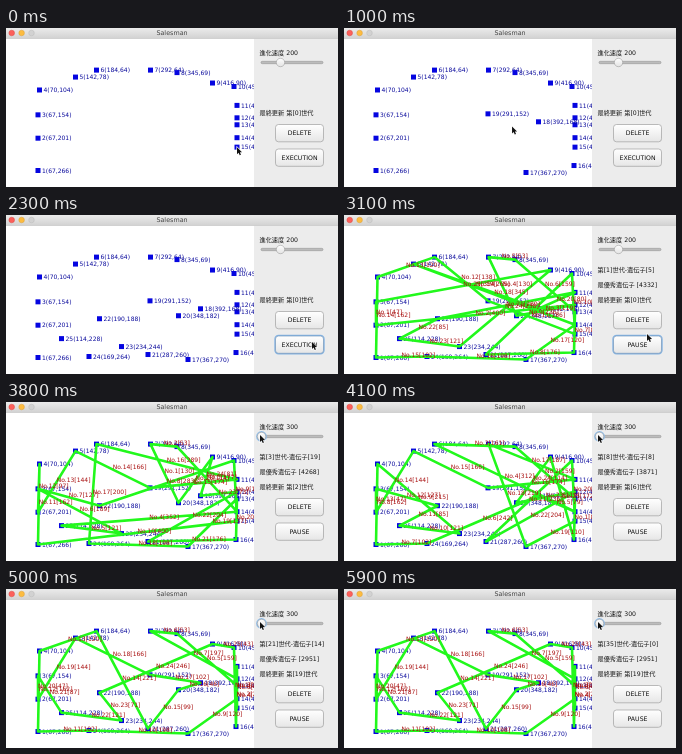
Animation, 332 px wide and 159 px high, one loop 6 s. Source, as an HTML page with a canvas:

```html
<!DOCTYPE html>
<html lang="ja">
<head>
<meta charset="utf-8">
<title>Salesman</title>
<style>
html, body { margin: 0; width: 100%; height: 100%; overflow: hidden; background: #fff; }
canvas { display: block; width: 332px; height: 159px; }
</style>
</head>
<body>
<canvas id="stage"></canvas>
<script>
const W = 332, H = 159, LOOP = 6000, STEP = 100, SPLIT = 248;
const FONT = '"DejaVu Sans", "Noto Sans CJK JP", "Noto Sans CJK", sans-serif';
const canvas = document.getElementById('stage');
const ctx = canvas.getContext('2d');
const dpr = window.devicePixelRatio || 1;
canvas.width = W * dpr;
canvas.height = H * dpr;

// Cities in the order they are clicked
const cities = [
  [67, 266], [67, 201], [67, 154], [70, 104], [142, 78],
  [184, 64], [292, 64], [345, 69], [416, 90], [459, 97],
  [465, 135], [465, 160], [465, 174], [465, 200], [465, 219],
  [463, 256], [367, 270], [392, 168], [291, 152], [348, 182],
  [287, 260], [190, 188], [234, 244], [169, 264], [114, 228]
];
const place = ([x, y]) => [x * 0.5 - 1.5, y * 0.497 + 10.3];

// One click every CLICK ms, starting with the fifteenth city
const CLICK = 200, OFFSET = 50, CLICKED = 15;
const START = 2420, GENES = 20;

const good = [10, 15, 18, 12, 21, 16, 13, 8, 7, 20, 14, 17, 24, 1, 4, 6, 11, 19, 5, 2, 3, 22, 25, 23, 9];
const best = [10, 16, 11, 15, 13, 8, 7, 12, 14, 17, 24, 1, 4, 6, 21, 20, 18, 19, 5, 2, 3, 25, 23, 22, 9];

function edges(tour) {
  return tour.map((n, i) => {
    const a = cities[n - 1], b = cities[tour[(i + 1) % tour.length] - 1];
    return { mid: [(a[0] + b[0]) / 2, (a[1] + b[1]) / 2], len: Math.hypot(a[0] - b[0], a[1] - b[1]) };
  });
}
const total = tour => edges(tour).reduce((sum, e) => sum + e.len, 0);

function seeded(seed) {
  return () => (seed = (seed * 16807) % 2147483647) / 2147483647;
}

// Reverses random stretches of a tour until it is about as long as the goal
function worsen(tour, goal) {
  const random = seeded(goal);
  for (let i = 0; i < 80; i++) {
    const [a, b] = [random(), random()].map(r => Math.floor(r * 26)).sort((p, q) => p - q);
    const next = [...tour.slice(0, a), ...tour.slice(a, b).reverse(), ...tour.slice(b)];
    const len = total(next);
    if (len > total(tour) && len <= goal) tour = next;
  }
  return tour;
}

const records = [[0, 4332], [2, 4268], [6, 3871], [9, 3612], [12, 3398], [19, 2951]]
  .map(([gen, score]) => ({
    gen, score,
    tour: gen < 12 ? worsen(good, score) : gen < 19 ? good : best
  }));

const geneKeys = [[START, 0], [3100, 25], [3680, 45], [3800, 79], [4500, 287], [5900, 700]];
const knobKeys = [[3450, 274], [3680, 255]];
const pointerKeys = [[2250, 306, 127], [2600, 306, 127], [3100, 303, 119], [3450, 273, 34], [3680, 254, 33]];

function interp(keys, t, col = 1) {
  const i = keys.findIndex(k => t <= k[0]);
  if (i === 0) return keys[0][col];
  if (i < 0) return keys[keys.length - 1][col];
  const a = keys[i - 1], b = keys[i];
  return a[col] + (b[col] - a[col]) * (t - a[0]) / (b[0] - a[0]);
}

const clicked = t => Math.min(cities.length, CLICKED + Math.max(0, Math.floor((t - OFFSET) / CLICK)));

// The pointer hops from city to city, then works the panel
function pointer(t) {
  const n = clicked(t);
  if (t > pointerKeys[0][0]) return [interp(pointerKeys, t, 1), interp(pointerKeys, t, 2)];
  const from = place(cities[n - 1]);
  const to = n < cities.length ? place(cities[n]) : pointerKeys[0].slice(1);
  const p = Math.max(0, (t - OFFSET) / CLICK - (n - CLICKED));
  const ease = p * p * (3 - 2 * p);
  return from.map((v, i) => v + (to[i] - v) * ease);
}

function text(str, x, y, color, size = 6, align = 'left') {
  ctx.font = `${size}px ${FONT}`;
  ctx.textAlign = align;
  ctx.fillStyle = color;
  ctx.fillText(str, x, y);
}

function disc(x, y, r, fill, stroke, width = 0.5) {
  ctx.beginPath();
  ctx.arc(x, y, r, 0, Math.PI * 2);
  ctx.fillStyle = fill;
  ctx.fill();
  ctx.strokeStyle = stroke;
  ctx.lineWidth = width;
  ctx.stroke();
}

function shade(y0, y1, from, to) {
  const g = ctx.createLinearGradient(0, y0, 0, y1);
  g.addColorStop(0, from);
  g.addColorStop(1, to);
  return g;
}

function box(x, y, w, h, r, fill, stroke, width) {
  ctx.beginPath();
  ctx.roundRect(x, y, w, h, r);
  ctx.fillStyle = fill;
  ctx.fill();
  ctx.strokeStyle = stroke;
  ctx.lineWidth = width;
  ctx.stroke();
}

function drawTitle() {
  ctx.fillStyle = shade(0, 10, '#ebebeb', '#d3d3d3');
  ctx.fillRect(0, 0, W, 10.5);
  ctx.fillStyle = '#b8b8b8';
  ctx.fillRect(0, 10, W, 0.5);
  disc(5.7, 5, 2.8, '#fc605b', '#de4643');
  disc(15.6, 5, 2.8, '#fdbc40', '#dd9f34');
  disc(25.5, 5, 2.8, '#d2d2d2', '#bababa');
  text('Salesman', 166, 7.3, '#444', 6.4, 'center');
}

function drawCity(city, i) {
  const [x, y] = place(city);
  ctx.fillStyle = '#0505e0';
  ctx.fillRect(x - 2.5, y - 2.5, 5, 5);
  text(`${i + 1}(${city})`, x + 4, y + 2.3, '#0a0a9c');
}

function drawTour(tour) {
  ctx.beginPath();
  tour.forEach(n => ctx.lineTo(...place(cities[n - 1])));
  ctx.closePath();
  ctx.strokeStyle = '#22f81c';
  ctx.lineWidth = 2.6;
  ctx.lineJoin = 'round';
  ctx.stroke();
  edges(tour).forEach(({ mid, len }, i) => {
    text(`No.${i + 1}[${Math.floor(len)}]`, ...place(mid), '#a80f0f');
  });
}

function drawMap(t, record) {
  ctx.save();
  ctx.beginPath();
  ctx.rect(0, 10.5, SPLIT, H);
  ctx.clip();
  cities.slice(0, clicked(t)).forEach(drawCity);
  if (record) drawTour(record.tour);
  ctx.restore();
}

function drawButton(label, y, focus) {
  const x = 269.5, w = 48, h = 17.3;
  if (focus) box(x, y, w, h, 3, '#fff', '#86b5e4', 2.4);
  box(x, y, w, h, 3, shade(y, y + h, '#fff', '#e6e6e6'), focus ? '#7799bb' : '#a0a0a0', 0.7);
  text(label, x + w / 2, y + h / 2 + 2.3, '#111', 6.2, 'center');
}

function drawSlider(knob, focus) {
  box(255, 33.3, 62, 2.4, 1.2, '#bcbcbc', '#8c8c8c', 0.5);
  if (focus) disc(knob + 0.5, 34.5, 4.4, '#fff', '#8fbce8', 2);
  disc(knob + 0.5, 34.5, 4.2, shade(30, 39, '#fff', '#e2e2e2'), '#909090');
}

function drawPanel(t, genes, record) {
  const knob = interp(knobKeys, t);
  const speed = 200 + Math.round((274 - knob) / 19 * 100);
  const dragged = t > 3400;
  const line = (str, y) => text(str, 253.5, y, '#151515', 6.2);

  ctx.fillStyle = '#ececec';
  ctx.fillRect(SPLIT, 10.5, W - SPLIT, H);
  line(`進化速度 ${speed}`, 26.5);
  drawSlider(knob, dragged);
  if (record) {
    line(`第[${Math.floor(genes / GENES)}]世代-遺伝子[${genes % GENES}]`, 56.5);
    line(`最優秀遺伝子 [${record.score}]`, 72.3);
  }
  line(`最終更新 第[${record ? record.gen : 0}]世代`, 87.2);
  drawButton('DELETE', 96.5, false);
  drawButton(record ? 'PAUSE' : 'EXECUTION', 121, t >= 2200 && !dragged);
}

function drawCursor(t) {
  const arrow = [[0, 0], [0, 7.8], [1.8, 6.2], [3, 9], [4.4, 8.4], [3.2, 5.7], [5.6, 5.6]];
  ctx.save();
  ctx.translate(...pointer(t));
  ctx.scale(0.9, 0.9);
  ctx.beginPath();
  arrow.forEach(p => ctx.lineTo(...p));
  ctx.closePath();
  ctx.strokeStyle = '#fff';
  ctx.lineWidth = 1.2;
  ctx.stroke();
  ctx.fillStyle = '#111';
  ctx.fill();
  ctx.restore();
}

function draw(now) {
  const t = Math.floor((now % LOOP) / STEP) * STEP;
  const genes = Math.floor(interp(geneKeys, t) + 1e-6);
  const record = t < START ? null : records.filter(r => r.gen * GENES <= genes).pop();

  ctx.setTransform(dpr, 0, 0, dpr, 0, 0);
  ctx.fillStyle = '#fff';
  ctx.fillRect(0, 0, W, H);
  drawMap(t, record);
  drawPanel(t, genes, record);
  drawTitle();
  drawCursor(t);
}

const begin = performance.now();
function tick() {
  draw(performance.now() - begin);
  requestAnimationFrame(tick);
}
tick();
</script>
</body>
</html>
```
